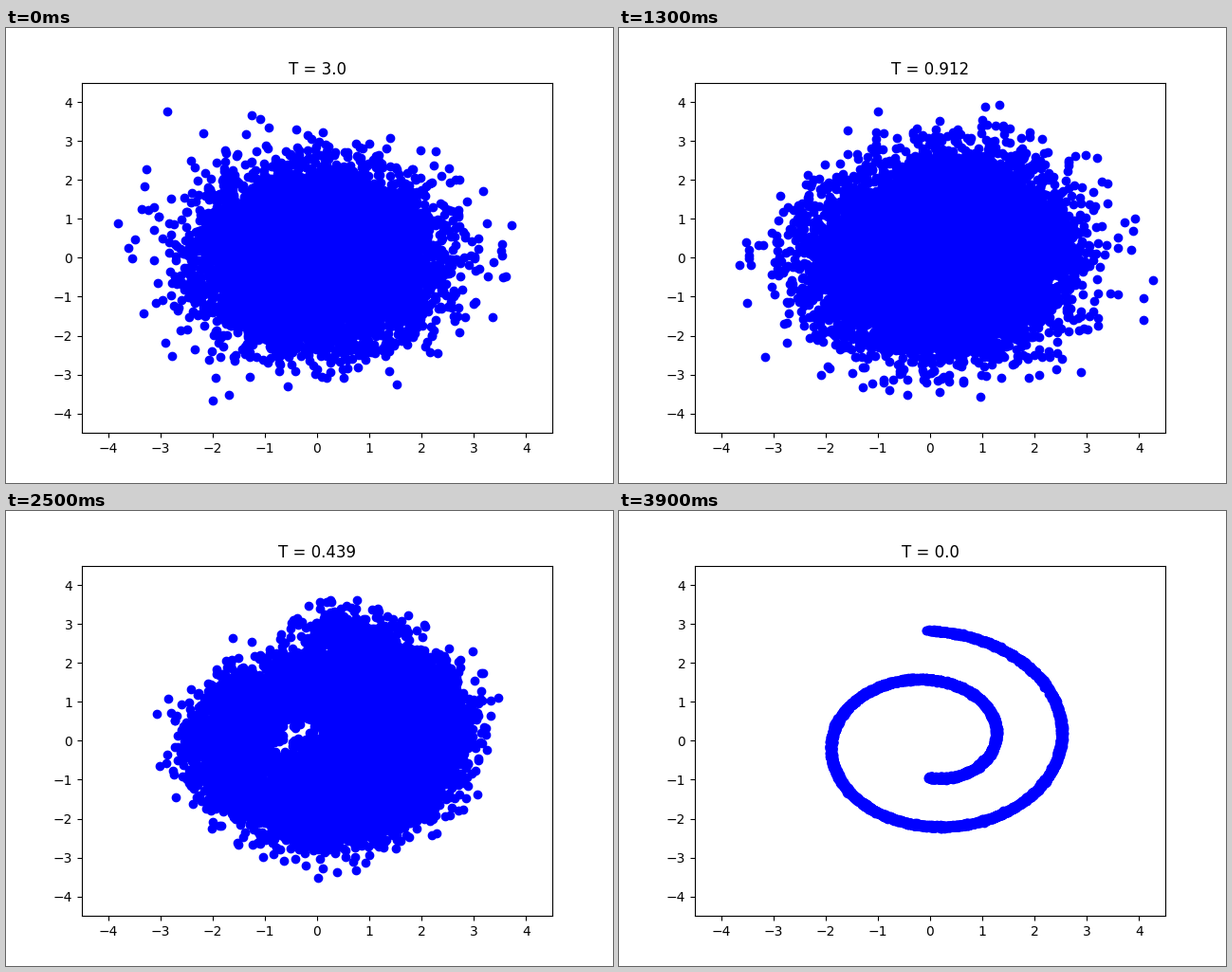
Animation, 640 px wide and 480 px high, one loop 4 s. Source, as a matplotlib script:

```python
import math

import matplotlib.pyplot as plt
import numpy as np
from matplotlib.animation import FuncAnimation

FRAMES = 40
INTERVAL = 100
POINTS = 10000
LIMIT = 4.5


def half_normal_quantile(u, q_max=3.18):
    """Quantile of a half-normal distribution cut off at q_max."""
    q = np.linspace(0, q_max, 4000)
    cdf = np.array([math.erf(v / math.sqrt(2)) for v in q])
    return np.interp(u, cdf / cdf[-1], q)


def time_schedule():
    """Diffusion times falling from 3 to 0, dense near the data."""
    q = half_normal_quantile(np.linspace(1, 0, FRAMES))
    knots = [39, 30, 21, 13, 9, 4, 0]
    times = [0, 0.276, 0.579, 0.912, 1.128, 1.535, 3]
    return np.interp(q, q[knots], times)


def swiss_roll(rng):
    """Spiral with slight jitter along and across the line."""
    t = 1.5 * np.pi * (1 + 2 * rng.random(POINTS))
    t += 0.02 * rng.standard_normal(POINTS)
    roll = np.stack([t * np.cos(t), t * np.sin(t)]) / 5
    return roll + 0.015 * rng.standard_normal(roll.shape)


def diffuse(times, rng):
    """Noise the roll step by step, then play the path backwards."""
    scale = np.exp(-times[::-1] ** 2 / 2)
    path = [swiss_roll(rng)]
    for before, after in zip(scale, scale[1:]):
        keep = after / before
        noise = rng.standard_normal((2, POINTS))
        path.append(keep * path[-1] + math.sqrt(1 - keep ** 2) * noise)
    return path[::-1]


times = time_schedule()
clouds = diffuse(times, np.random.default_rng(3))

fig, ax = plt.subplots(figsize=(6.4, 4.8), dpi=100)
ax.set_xlim(-LIMIT, LIMIT)
ax.set_ylim(-LIMIT, LIMIT)
dots, = ax.plot([], [], "bo")
title = ax.set_title("")


def update(i):
    dots.set_data(*clouds[i])
    title.set_text(f"T = {round(float(times[i]), 3)}")
    return dots, title


anim = FuncAnimation(fig, update, frames=FRAMES, interval=INTERVAL,
                     repeat=True, repeat_delay=0)
plt.show()
```
